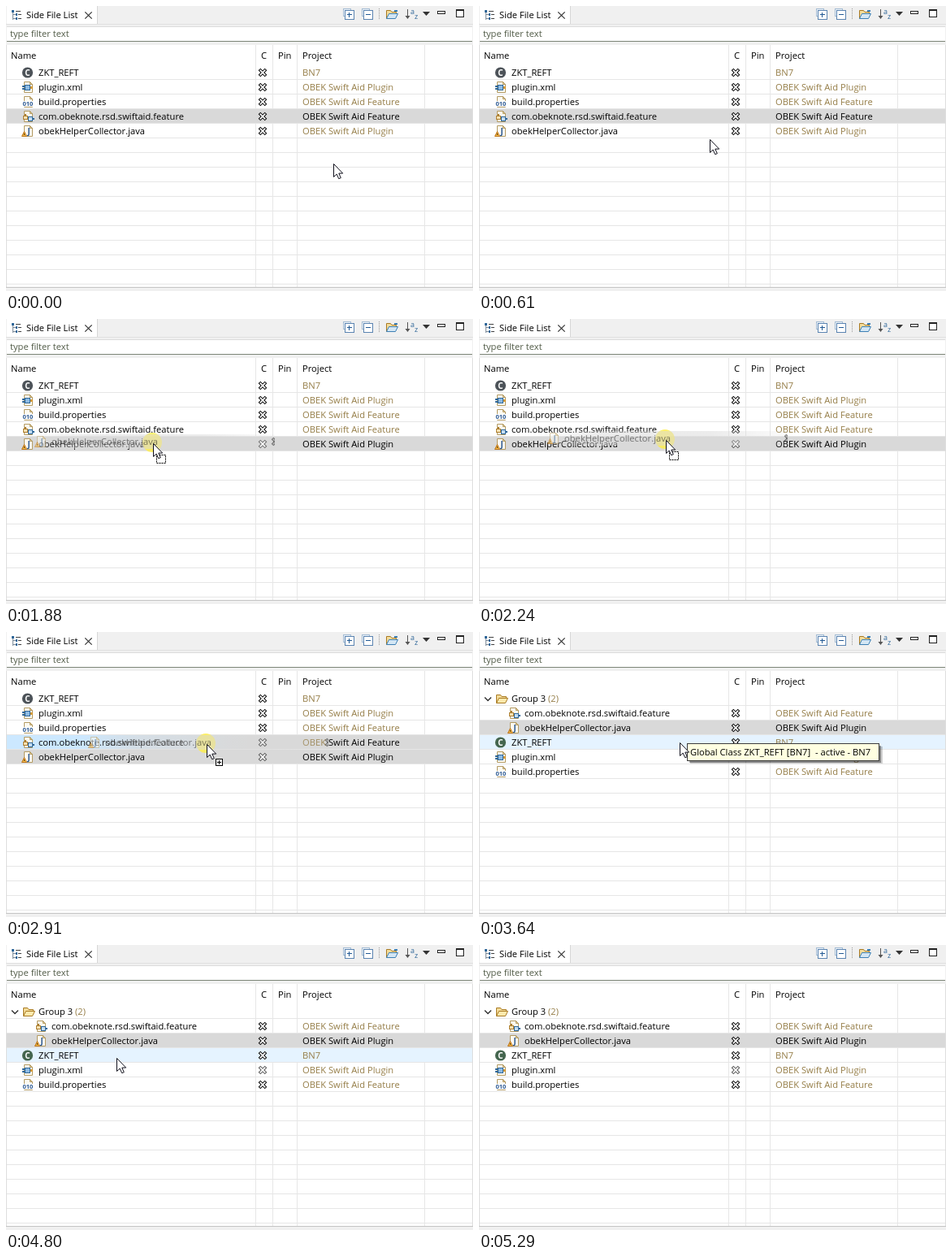
An HTML page with a canvas for the animation above (5.57 s loop, 575 px wide and 351 px high).

```html
<!DOCTYPE html>
<html lang="en">
<head>
<meta charset="utf-8">
<title>Side File List</title>
<style>
html, body { margin: 0; width: 100%; height: 100%; overflow: hidden; background: #f0f0f0; }
canvas { display: block; width: 575px; height: 351px; }
</style>
</head>
<body>
<canvas id="stage" width="575" height="351"></canvas>
<script>
const ctx = document.getElementById('stage').getContext('2d');
const LOOP = 5570, STEP = 70, SLACK = 12;
const TOP = 73, ROW = 18;
const PRESS = 1550, DRAG = 1690, DROP = 3240, TIP_ON = 3640, TIP_OFF = 4310, GONE = 5290;
const FONT = '11.2px "Open Sans", "Noto Sans", sans-serif';
const OLIVE = '#957d47', GRID = '#e6e6e6', SELECTED = '#d9d9d9', HOVER = '#e5f3ff';

const PLUGIN = 'OBEK Swift Aid Plugin', FEATURE = 'OBEK Swift Aid Feature';
const cls = { icon: classIcon, name: 'ZKT_REFT', project: 'BN7' };
const plugin = { icon: pluginIcon, name: 'plugin.xml', project: PLUGIN };
const build = { icon: buildIcon, name: 'build.properties', project: FEATURE };
const feature = { icon: featureIcon, name: 'com.obeknote.rsd.swiftaid.feature', project: FEATURE };
const java = { icon: javaIcon, name: 'obekHelperCollector.java', project: PLUGIN };
const group = { name: 'Group 3', count: '(2)' };

const flatRows = [cls, plugin, build, feature, java];
const groupedRows = [group, feature, java, cls, plugin, build];

// Moments at which a run of steps begins
const bursts = [0, 270, 880, PRESS, 2170, 2780, DROP, TIP_ON, TIP_OFF, 4870];

// Pointer path: time, x, y
const path = [
  [0, 403, 194], [70, 402, 193], [200, 402, 193], [270, 396, 191], [550, 312, 168],
  [820, 205, 151], [950, 160, 143], [1080, 140, 149], [1220, 163, 151], [1550, 165, 152],
  [1690, 167, 153], [2090, 208, 154], [2240, 230, 149], [2450, 239, 146], [2710, 245, 140],
  [2910, 247, 138], [3170, 247, 138], [3240, 247, 136], [4240, 247, 136], [4450, 123, 107],
  [4590, 112, 109], [4800, 136, 139], [4870, 146, 152], [5290, 240, 356]
];

function stepped(now) {
  const begin = bursts.filter(b => b <= now).pop();
  return begin + Math.floor((now - begin + SLACK) / STEP) * STEP;
}

function pointer(t) {
  for (let i = 1; i < path.length; i++) {
    const [t0, x0, y0] = path[i - 1], [t1, x1, y1] = path[i];
    if (t <= t1) {
      const k = (t - t0) / (t1 - t0);
      return { x: Math.round(x0 + (x1 - x0) * k), y: Math.round(y0 + (y1 - y0) * k) };
    }
  }
  return { x: 240, y: 356 };
}

function rect(x, y, w, h, color) {
  ctx.fillStyle = color;
  ctx.fillRect(x, y, w, h);
}

function frame(x, y, w, h, color, fill) {
  if (fill) rect(x, y, w, h, fill);
  ctx.strokeStyle = color;
  ctx.lineWidth = 1;
  ctx.strokeRect(x + 0.5, y + 0.5, w - 1, h - 1);
}

function text(s, x, y, color = '#000', font = FONT) {
  ctx.font = font;
  ctx.fillStyle = color;
  ctx.fillText(s, x, y);
}

function shape(points, fill, stroke, width = 1, closed = true) {
  ctx.beginPath();
  points.forEach(([x, y]) => ctx.lineTo(x, y));
  if (closed) ctx.closePath();
  if (fill) { ctx.fillStyle = fill; ctx.fill(); }
  if (stroke) { ctx.strokeStyle = stroke; ctx.lineWidth = width; ctx.stroke(); }
}

function disc(x, y, r, fill) {
  ctx.beginPath();
  ctx.arc(x, y, r, 0, Math.PI * 2);
  ctx.fillStyle = fill;
  ctx.fill();
}

function at(x, y, draw, ...args) {
  ctx.save();
  ctx.translate(x, y);
  draw(...args);
  ctx.restore();
}

// Two diagonal strokes through the origin
function diagonals(r, color, width) {
  shape([[-r, -r], [r, r]], null, color, width, false);
  shape([[-r, r], [r, -r]], null, color, width, false);
}

function cross(color) {
  diagonals(4, color, 3.8);
  diagonals(3.3, '#fff', 1.7);
}

function page() {
  shape([[3.5, 1.5], [10.5, 1.5], [13.5, 4.5], [13.5, 14.5], [3.5, 14.5]], '#fdfaf0', '#b39a62');
  shape([[10.5, 1.5], [10.5, 4.5], [13.5, 4.5]], '#ead9a8', '#b39a62');
}

function classIcon(grouped) {
  disc(7.5, 8, 6.6, grouped ? '#45664f' : '#4d5359');
  ctx.textAlign = 'center';
  text('C', 7.5, 11.6, '#fff', 'bold 10px "Open Sans", sans-serif');
  ctx.textAlign = 'left';
}

function pluginIcon() {
  page();
  frame(4, 5, 7, 7, '#2f6799', '#8dbbe3');
  rect(1, 6, 3, 2, '#2f6799');
  rect(1, 9, 3, 2, '#2f6799');
  rect(11, 7, 3, 3, '#d29b3c');
}

function buildIcon() {
  page();
  rect(1, 7, 14, 7, '#fff');
  text('010', 1.5, 13.2, '#2a5790', 'bold 7.5px "Open Sans", sans-serif');
}

function featureIcon() {
  page();
  frame(2, 7, 6, 5, '#ae7f31', '#f6e2b4');
  frame(8, 8, 6, 6, '#2f6799', '#c4def4');
  rect(4, 5, 2, 2, '#ae7f31');
  rect(14, 10, 2, 2, '#2f6799');
}

function javaIcon() {
  page();
  text('J', 7.6, 11.5, '#2a5790', 'bold 10px "Open Sans", sans-serif');
  shape([[3.5, 8.5], [6.5, 14.5], [0.5, 14.5]], '#f7c04a', '#b9701a');
  rect(3, 11, 1, 2, '#553300');
}

function folderIcon(front = '#fde9ac', edge = '#a87a24') {
  shape([[1.5, 13.5], [1.5, 3.5], [6.5, 3.5], [8, 5.5], [13.5, 5.5], [13.5, 8]], '#f4dc9a', '#a87a24');
  shape([[1.5, 13.5], [4.5, 7.5], [15.5, 7.5], [12.5, 13.5]], front, edge);
}

function boxes(plus) {
  frame(0, 0, 10, 10, '#a3bbd3', '#eef4fa');
  frame(2, 2, 12, 12, '#5b84b1', '#fff');
  rect(5, 7, 6, 1, '#235a94');
  if (plus) rect(7, 5, 1, 6, '#235a94');
}

function drawTabBar() {
  rect(0, 0, 575, 48, '#f0f0f0');
  rect(1, 0, 111, 23, '#fff');
  rect(112, 0, 1, 22, '#d6d6d6');
  rect(0, 22, 575, 1, '#e0e0e0');

  rect(7, 5, 3, 3, '#2f6799');
  rect(8, 8, 1, 9, '#7f8d9b');
  for (const y of [10, 15]) {
    rect(9, y, 3, 1, '#7f8d9b');
    rect(12, y - 1, 2, 3, '#2f6799');
    rect(15, y, 4, 1, '#444');
  }
  rect(12, 6, 6, 1, '#444');
  text('Side File List', 25, 15);
  at(101.5, 11.5, diagonals, 4.2, '#333', 1.2);

  at(415, 3, boxes, true);
  at(438, 3, boxes, false);
  for (let y = 3; y < 17; y += 2) rect(459, y, 1, 1, '#9a9a9a');
  at(467, 2, folderIcon, '#d3e6f4', '#3d80b5');
  rect(478, 5, 4, 2, '#3d80b5');

  rect(494, 4, 1, 11, '#555');
  shape([[491.5, 12], [497.5, 12], [494.5, 16]], '#555');
  text('a', 498, 10, '#2f6799', '9px "Open Sans", sans-serif');
  text('z', 503, 16, '#2f6799', '9px "Open Sans", sans-serif');
  shape([[513, 7], [522, 7], [517.5, 12]], '#333');
  frame(531, 6, 10, 4, '#222', '#fff');
  frame(554, 4, 10, 10, '#222', '#fff');
  rect(554, 5, 10, 1, '#222');

  rect(1, 25, 573, 18, '#fff');
  rect(1, 25, 573, 1, '#dcdcdc');
  rect(1, 43, 573, 1, '#7c8577');
  text('type filter text', 5, 38, '#525c48');
}

function drawTable() {
  rect(1, 48, 573, 298, '#fff');
  for (let y = TOP + ROW - 1; y < 346; y += ROW) rect(1, y, 573, 1, GRID);
  for (const x of [307, 328, 358, 515]) rect(x, 48, 1, 298, GRID);
  rect(0, 48, 1, 298, '#dedede');
  rect(574, 48, 1, 298, '#dedede');
  rect(0, 346, 575, 1, '#c4c4c4');
  rect(0, 347, 575, 4, '#f0f0f0');
  text('Name', 6, 65);
  text('C', 314, 65);
  text('Pin', 335, 65);
  text('Project', 365, 65);
}

function fillRow(y, color, x = 1) {
  rect(x, y, 574 - x, ROW - 1, color);
}

function dropTint(x) {
  const g = ctx.createLinearGradient(0, 0, x + 150, 0);
  g.addColorStop(0, '#cce8ff');
  g.addColorStop(0.24, '#cce8ff');
  g.addColorStop(0.75, SELECTED);
  return g;
}

function clipped(x, w, draw) {
  ctx.save();
  ctx.beginPath();
  ctx.rect(x, 0, w, 351);
  ctx.clip();
  draw();
  ctx.restore();
}

function drawRow(row, i, s) {
  const y = TOP + i * ROW, base = y + 13;
  const selected = row === s.selected, target = row === s.target;
  if (selected) fillRow(y, SELECTED);
  else if (target) fillRow(y, dropTint(s.x));
  else if (i === s.hover) fillRow(y, HOVER);

  if (row === group) {
    shape([[7, y + 7.5], [11, y + 11.5], [15, y + 7.5]], null, '#333', 1.4, false);
    at(20, y + 1, folderIcon);
    text(row.name, 40, base);
    text(row.count, 85, base, OLIVE);
    return;
  }
  const indent = s.grouped && (row === feature || row === java) ? 16 : 0;
  at(19 + indent, y + 1, row.icon, s.grouped);
  text(row.name, 40 + indent, base);
  const dim = (s.dragging && row === java) || (s.grouped && row === plugin);
  at(316, y + 9, cross, dim ? '#555' : '#000');
  text(row.project, 365, base, selected ? '#000' : OLIVE);
  if (target) {
    const edge = s.x + 150;
    clipped(edge, 200, () => {
      fillRow(y, SELECTED, edge);
      text(row.project, 365, base);
    });
  }
}

function drawGhost(x, y) {
  const left = x - 157, right = x + 150, top = y - 11;
  const wash = ctx.createLinearGradient(left, 0, right, 0);
  wash.addColorStop(0, 'rgba(217,217,217,0)');
  wash.addColorStop(0.25, 'rgba(217,217,217,.5)');
  wash.addColorStop(0.7, 'rgba(217,217,217,.5)');
  wash.addColorStop(1, 'rgba(217,217,217,.1)');
  rect(left, top, right - left, ROW, wash);
  clipped(left, right - left, () => {
    ctx.globalAlpha = 0.48;
    at(x - 146, top + 1, javaIcon);
    text(java.name, x - 125, top + 13);
    at(x + 151, top + 9, cross, '#000');
  });
}

function drawPointer(s) {
  if (s.dragging) {
    if (s.target) {
      frame(s.x + 11, s.y + 18, 9, 9, '#000', '#fff');
      rect(s.x + 13, s.y + 22, 5, 1, '#000');
      rect(s.x + 15, s.y + 20, 1, 5, '#000');
    } else {
      ctx.setLineDash([2, 1]);
      frame(s.x + 4, s.y + 14, 12, 11, '#000', '#fff');
      ctx.setLineDash([]);
    }
  }
  at(s.x + 0.5, s.y + 0.5, shape,
    [[0, 0], [0, 16], [3.7, 12.6], [6.2, 18.2], [8.8, 17.2], [6.3, 11.6], [11.2, 11.6]],
    '#fff', '#10101c');
}

function drawTooltip() {
  rect(260, 141, 237, 21, 'rgba(0,0,0,.18)');
  rect(259, 140, 236, 21, 'rgba(0,0,0,.35)');
  frame(256, 137, 237, 22, '#3c3c3c', '#ffffe1');
  text(`Global Class ${cls.name} [${cls.project}]  - active - ${cls.project}`, 260, 152);
}

function render(now) {
  const t = stepped(now % LOOP);
  const s = pointer(t);
  s.grouped = t >= DROP;
  s.pressed = t >= PRESS && !s.grouped;
  s.dragging = t >= DRAG && !s.grouped;
  s.selected = t < PRESS ? feature : java;
  s.target = s.dragging && s.y < TOP + 4 * ROW ? feature : null;
  s.hover = s.pressed || t >= GONE ? -1 : Math.floor((s.y - TOP) / ROW);

  drawTabBar();
  drawTable();
  (s.grouped ? groupedRows : flatRows).forEach((row, i) => drawRow(row, i, s));
  if (s.pressed) disc(s.x - 1, s.y - 1, 12, 'rgba(255,238,70,.8)');
  if (s.dragging) drawGhost(s.x, s.y);
  if (t >= TIP_ON && t < TIP_OFF) drawTooltip();
  if (t < GONE) drawPointer(s);
}

const start = performance.now();
function tick() {
  render(performance.now() - start);
  requestAnimationFrame(tick);
}
tick();
</script>
</body>
</html>
```
